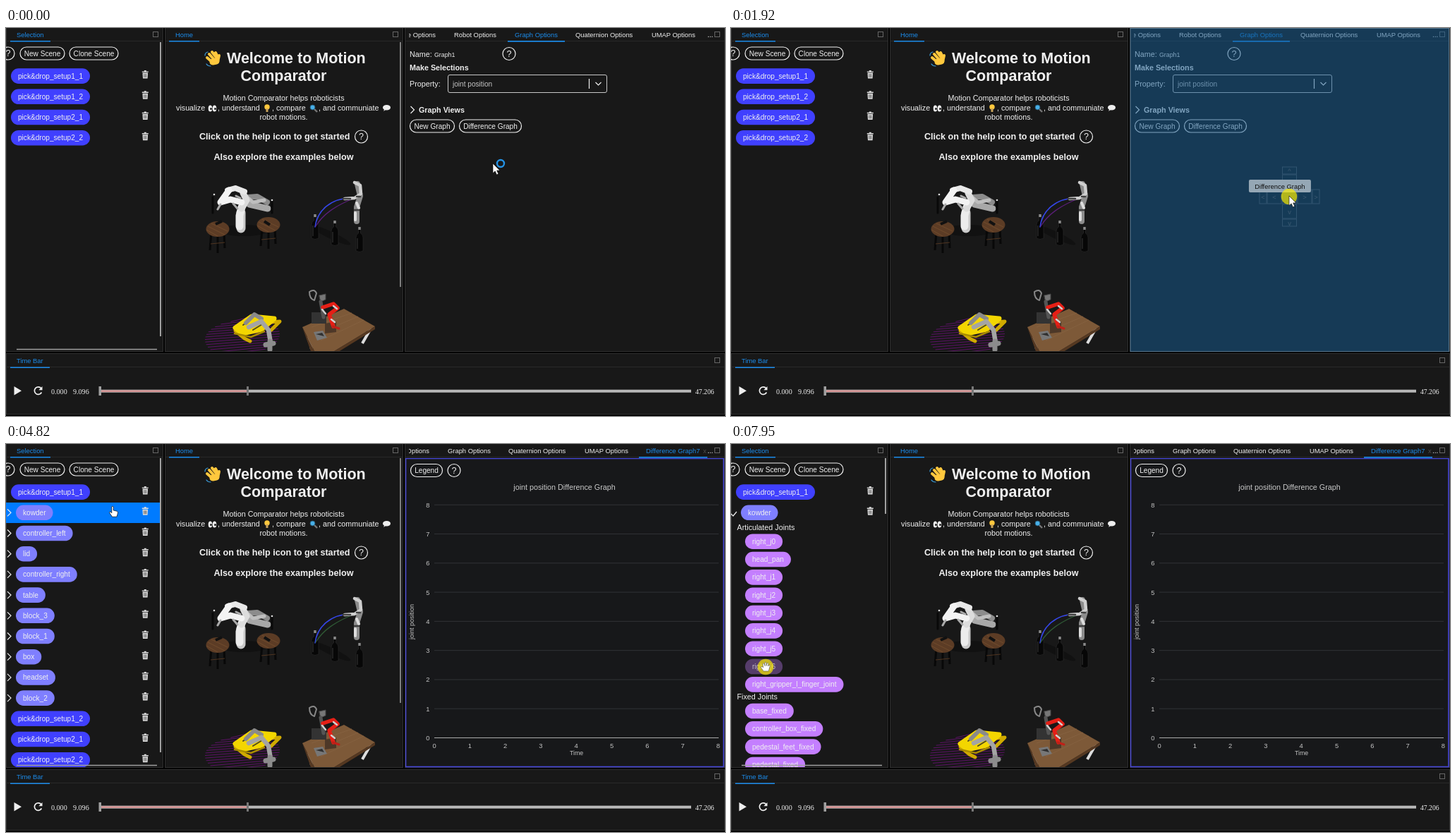
An HTML page that plays this animation: 1019x550 px, repeating every 8000 ms.

```html
<!DOCTYPE html>
<html lang="en">
<head>
<meta charset="utf-8">
<title>Motion Comparator</title>
<style>
html, body { margin: 0; width: 100%; height: 100%; overflow: hidden; background: #000; }
svg { display: block; width: 1019px; height: 550px; }
text { font: 10.1px "Liberation Sans", Arial, sans-serif; fill: #f0f0f0; dominant-baseline: central; white-space: pre; }
.tab { font-size: 9.4px; }
.on { fill: #1c8ceb; }
.body { font-size: 10.75px; }
.bold { font-size: 10.75px; font-weight: bold; }
.h1 { font-size: 21.5px; font-weight: bold; }
.h3 { font-size: 12.6px; font-weight: bold; }
.name { font-size: 8.8px; }
.time { font-family: "Liberation Serif", "Times New Roman", serif; }
.tick { font-size: 9.4px; fill: #c4c4c4; }
.mid { text-anchor: middle; }
.end { text-anchor: end; }
.line { fill: none; stroke: #f0f0f0; stroke-width: 1.2; }
.bar { stroke: #a0a0a0; stroke-width: 1.5; }
.limb { fill: none; stroke-linecap: round; stroke-linejoin: round; }
.dim rect { opacity: .36; }
.dim text { opacity: .7; }
</style>
</head>
<body>
<svg viewBox="0 0 1019 550">
  <defs>
    <clipPath id="listClip"><rect y="20" width="221" height="438"/></clipPath>
    <clipPath id="homeClip"><rect x="226" y="20" width="337" height="438"/></clipPath>
    <clipPath id="paneClip"><rect x="566" y="20" width="452" height="439"/></clipPath>
    <clipPath id="tabClip"><rect x="571" width="423" height="20"/></clipPath>
    <g id="trash"><path d="M-4.5-4H4.5M-1.5-5.3H1.5" stroke="#ddd" stroke-width="1.4"/><path d="M-3.8-2.5H3.8L3.3 5.5H-3.3Z" fill="#ddd"/><path d="M-1.6-1V4M0-1V4M1.6-1V4" stroke="#222" stroke-width=".6"/></g>
    <g id="bottle"><path d="M-1.5-19H1.5V-11Q5-9 5-5V14Q0 17-5 14V-5Q-5-9-1.5-11Z" fill="#070707" stroke="#333" stroke-width=".5"/><path d="M-1.7-20H1.7V-16H-1.7Z" fill="#8a8a8a"/><path d="M-3-4V11" stroke="#3b3b3b"/></g>
    <g id="stool"><path d="M-9 4L-11 30M9 4L10 27M0 6V34" stroke="#080808" stroke-width="3"/><path d="M-10 21L10 19" stroke="#503520"/><ellipse rx="16.5" ry="11" fill="#5c3c25"/><path d="M-14-4L10 8M-9-8L14 3M-16 1L0 10" stroke="#75502f" stroke-width=".8"/></g>
  </defs>
  <g id="frames"></g>
  <g id="tabs"></g>

  <g clip-path="url(#listClip)">
    <rect id="hover" width="219" height="29" fill="#007bff"/>
    <g id="rows4"></g><g id="rows14"></g><g id="joints"></g>
    <g id="listBars"><rect id="thumb" x="218" y="20" width="2" fill="#a0a0a0"/><path class="bar" d="M15 455.5H214"/></g>
  </g>
  <g id="tools"></g>

  <g clip-path="url(#homeClip)">
    <path id="homeBar" class="bar" d="M559 20V367"/>
    <g id="homeText"></g>
    <!-- emoji -->
    <g class="limb" stroke="#ffc83d" stroke-width="4">
      <path d="M288 37L296 46M292 34L299 43M285 42L293 49M297 35L300 41M302 39L300 48"/>
      <path d="M293 48L298 47" stroke-width="9"/>
      <path d="M282 39Q282 35 286 34M284 51Q286 54 290 54" stroke="#3b9ddb" stroke-width="1.2"/>
    </g>
    <ellipse cx="289.5" cy="114" rx="2.8" ry="4.5" fill="#eee"/><ellipse cx="295.5" cy="114" rx="2.8" ry="4.5" fill="#eee"/>
    <circle cx="290.5" cy="114.5" r="1.5" fill="#222"/><circle cx="296.5" cy="114.5" r="1.5" fill="#222"/>
    <circle cx="370" cy="112" r="3.7" fill="#ffc83d"/><path d="M368.5 114H371.5V119H368.5Z" fill="#c9a25a"/>
    <path d="M437 115L441 119" stroke="#777" stroke-width="2.4"/><circle cx="434.5" cy="112.5" r="3.4" fill="#48b0e8" stroke="#286080"/>
    <path d="M535 118L537 114H541Z" fill="#eee"/><ellipse cx="539.5" cy="112.7" rx="5.5" ry="3.8" fill="#eee"/>

    <!-- twin arms -->
    <ellipse cx="337" cy="287" rx="35" ry="8" fill="#111"/>
    <g class="limb">
      <path d="M343 240L356 239L370 247" stroke="#8c8c8c" stroke-width="8"/>
      <path d="M345 250L358 253L371 256" stroke="#a8a8a8" stroke-width="9"/>
      <path d="M340 238L350 247L366 244" stroke="#bebebe" stroke-width="5"/>
      <path d="M293 240V262M377 246V262" stroke="#090909" stroke-width="3"/>
    </g>
    <use href="#stool" x="300" y="285"/><use href="#stool" x="372" y="279"/>
    <path d="M297 278L306 274M366 274L374 279" stroke="#111" stroke-width="4"/>
    <g class="limb">
      <path d="M333 284V262" stroke="#c9c9c9" stroke-width="13"/>
      <path d="M331 281V266L334 254" stroke="#ececec" stroke-width="11"/>
      <path d="M334 256L341 244L336 234" stroke="#dcdcdc" stroke-width="9"/>
      <path d="M338 232L325 227L314 230" stroke="#e8e8e8" stroke-width="8"/>
      <path d="M316 230L304 247L318 243L334 247" stroke="#f3f3f3" stroke-width="9"/>
      <path d="M304 250L300 257M322 249L328 256M326 238L332 241" stroke="#aaa" stroke-width="3"/>
    </g>
    <circle cx="295" cy="236" r="1.3" fill="#ddd"/><circle cx="377" cy="244" r="1.3" fill="#ddd"/>

    <!-- arm with traces -->
    <ellipse cx="461" cy="294" rx="30" ry="5" fill="#111" transform="rotate(25 461 294)"/>
    <use href="#bottle" x="438" y="284"/><use href="#bottle" x="466" y="293"/><use href="#bottle" x="501" y="302"/>
    <g class="limb">
      <path d="M438 282C441 259 460 241 490 241" stroke="#3546e8" stroke-width="1.6"/>
      <path id="trace" d="M439 281C449 264 466 253 489 243" stroke="#5a1e78" stroke-width="1.3"/>
      <path d="M497 274V254L502 238L498 221" stroke="#8c8c8c" stroke-width="8"/>
      <path d="M494 219L502 223L503 235L494 241L480 242" stroke="#cfcfcf" stroke-width="4.5"/>
      <path d="M495 262V272M497 248L500 255" stroke="#ddd" stroke-width="4"/>
      <path d="M478 242H488M497 239H502M494 258H500" stroke="#404040" stroke-width="2.5"/>
    </g>

    <!-- walking robot -->
    <g id="disc" stroke="#5c1266" stroke-width="1"></g>
    <g class="limb">
      <path d="M325 429L338 440L346 444M372 417L388 416L376 428" stroke="#d0aa00" stroke-width="5"/>
      <path d="M325 425L348 409L380 412L362 427L335 433Z" fill="#f3d600" stroke="#f3d600" stroke-width="7"/>
      <path d="M324 433L347 438L366 430" stroke="#a88b00" stroke-width="2.5"/>
      <path d="M336 421L347 413M350 428L363 420" stroke="#514a20" stroke-width="2"/>
      <path d="M340 418L352 406L362 412" stroke="#8a8a8a" stroke-width="6"/>
      <path d="M344 424L362 416L372 428L375 446" stroke="#a4a4a4" stroke-width="6.5"/>
      <path d="M374 444V456M368 449L379 447" stroke="#8c8c8c" stroke-width="7"/>
    </g>

    <!-- table scene -->
    <path d="M428 432L433 455M517 426L505 447" stroke="#ddd" stroke-width="4"/>
    <path d="M420 424L479 398L523 423L462 460H438Z" fill="#7d5938"/>
    <path d="M420 424L438 460H462L523 423V427L463 464H434Z" fill="#553821"/>
    <path d="M433 424L490 404M446 443L507 414M440 434L499 409" stroke="#856140"/>
    <path d="M433 403H454V419H433Z" fill="#333"/><path d="M436 431L449 429L455 439L441 443Z" fill="#777"/><path d="M439 434L448 432L451 437" fill="#303030"/>
    <path d="M452 419L468 416V431L452 433Z" fill="#4d3828"/>
    <g class="limb">
      <path d="M430 374Q437 369 440 376L437 386Q430 384 430 374" stroke="#888" stroke-width="2"/>
      <path d="M444 379L453 377V385L446 388Z" fill="#777" stroke="#444"/>
      <path d="M446 388L450 410" stroke="#555" stroke-width="5"/>
      <path d="M449 396L464 391L470 397L458 406L464 423" stroke="#e51f16" stroke-width="5.5"/>
      <path d="M448 399L453 405M464 394L469 398M461 413L466 417" stroke="#d0d0d0" stroke-width="2.5"/>
      <path d="M463 423L472 426" stroke="#c02018" stroke-width="3"/>
    </g>
  </g>

  <g clip-path="url(#paneClip)"><g id="slider"><g id="options"></g><g id="graph" transform="translate(904)"></g></g></g>
  <g id="timeBar"></g>

  <g id="drag">
    <rect id="drop" fill="rgb(20,92,148)" fill-opacity=".5" stroke="#56758c"/>
    <g id="guide" opacity=".17"></g>
    <g id="ghost"><rect x="-57" y="-23" width="88" height="18" rx="2" fill="#95a7b5"/><text class="tab mid" x="-13" y="-13.5" style="fill:#111">Difference Graph</text></g>
  </g>
  <g id="mouse">
    <circle id="ring" cx="11" cy="0" r="5" fill="none" stroke="#2492e4" stroke-width="2.4"/>
    <circle id="press" cy="1" r="11.3" fill="#fff000" opacity=".68"/>
    <path id="arrow" d="M0 0V13.7L3.2 10.9L5.4 15.9L7.9 14.8L5.7 10H10Z" fill="#fff" stroke="#000" stroke-width=".6"/>
    <path id="finger" d="M-1.2 1Q0-.8 1.2 1V6L6.5 7.3Q7.8 7.8 7.5 10L6 15.2H-.5L-4.3 9.5Q-4.4 7.6-2.7 8.2L-1.2 9.7Z" fill="#fff" stroke="#000" stroke-width=".7"/>
    <path id="palm" d="M-3 7L-6.5 1.8Q-6.5 0-4.8.5L-3.3 2L-4-3.2Q-3.2-5-2-3.4L-1-.5V-5Q0-6.5 1-5V-.5L2.2-4.2Q3.4-5.4 4-3.6L3.4 0L5-1.7Q6.6-2 6.2 0L4.2 7Z" fill="#fff" stroke="#555" stroke-width=".6"/>
  </g>
</svg>
<script>
const $ = id => document.getElementById(id);
const fill = (id, ...parts) => { $(id).innerHTML = parts.flat().join(''); };
const show = (id, on) => { $(id).style.display = on ? '' : 'none'; };
const ruler = document.createElement('canvas').getContext('2d');
ruler.font = '10.1px "Liberation Sans", Arial, sans-serif';

const esc = s => s.replace('&', '&amp;').replace('<', '&lt;');
const text = (s, x, y, cls = '') => `<text x="${x}" y="${y}" class="${cls}">${esc(s)}</text>`;
const rect = (x, y, w, h, attrs) => `<rect x="${x}" y="${y}" width="${w}" height="${h}" ${attrs}/>`;
const path = (d, attrs = 'class="line"') => `<path d="${d}" ${attrs}/>`;
const box = (x, y) => rect(x, y, 7, 7, 'fill="none" stroke="#666"');
const help = (x, y) => `<circle cx="${x}" cy="${y}" r="9" class="line"/>` + text('?', x, y, 'h3 mid" style="font-weight:400');
const button = (s, x, y, w) => rect(x, y - 9, w, 18, 'rx="9" class="line"') + text(s, x + w / 2, y, 'mid');
const pill = (s, x, y, color, id = '') =>
  `<g id="${id}">${rect(x, y - 10.8, ruler.measureText(s).width + 20, 21.6, `rx="10.8" fill="${color}"`)}${text(s, x + 10, y)}</g>`;
const trash = y => `<use href="#trash" x="197.3" y="${y - 2}"/>`;
const blue = '#4040ff', violet = '#7f7fff', purple = '#c47fff';
const rowY = i => 68.1 + 29.2 * i;
const jointY = i => 138.2 + 25.33 * i;

// Panels and tabs
const panel = (x, y, w, h) => rect(x + .5, y + .5, w, h, 'fill="#181818" stroke="#303030"') + path(`M${x} ${y + 19.5}h${w}`, 'stroke="#292929"');
fill('frames', panel(0, -1, 222, 459), panel(225, -1, 337, 459), panel(565, -1, 453, 459), panel(0, 461, 1018, 86),
  text('Selection', 15, 9, 'tab on'), text('Home', 240, 9, 'tab on'), text('Time Bar', 15, 471, 'tab on'),
  path('M6 18.7H63M231 18.7H274M6 481.2H62', 'stroke="#1c8ceb" stroke-width="1.6"'),
  box(208.5, 5.5), box(548.5, 5.5), box(1004.5, 5.5), box(1004.5, 467.5), text('...', 994, 9));
$('tabs').setAttribute('clip-path', 'url(#tabClip)');
fill('tabs', '<g id="strip">', text('Scene Options', 609, 9, 'tab end'), text('Robot Options', 635, 9, 'tab'),
  text('Graph Options', 721, 9, 'tab" id="tabA'), text('Quaternion Options', 807, 9, 'tab'), text('UMAP Options', 915, 9, 'tab'),
  text('Difference Graph7', 1002, 9, 'tab" id="tabB'), text('x', 1083, 9, 'tab" opacity=".25'),
  '<rect id="ink" y="18" height="1.7" class="on"/></g>');

// Selection list
const sets = ['1_1', '1_2', '2_1', '2_2'].map(s => 'pick&drop_setup' + s);
const items = ['kowder', 'controller_left', 'lid', 'controller_right', 'table', 'block_3', 'block_1', 'box', 'headset', 'block_2'];
const joints = ['right_j0', 'head_pan', 'right_j1', 'right_j2', 'right_j3', 'right_j4', 'right_j5', 'right_j6', 'right_gripper_l_finger_joint'];
const fixed = ['base_fixed', 'controller_box_fixed', 'pedestal_feet_fixed', 'pedestal_fixed'];
const setRow = (s, i) => pill(s, 7, rowY(i), blue) + trash(rowY(i));
fill('tools', help(3, 36), button('New Scene', 20, 36, 63), button('Clone Scene', 90, 36, 69));
fill('rows4', sets.map(setRow));
fill('rows14', setRow(sets[0], 0),
  items.map((s, i) => pill(s, 14, rowY(i + 1), violet) + trash(rowY(i + 1)) + path(`M2 ${rowY(i + 1) - 5}l5 5l-5 5`)),
  sets.slice(1).map((s, i) => setRow(s, i + 11)));
fill('joints', setRow(sets[0], 0), pill(items[0], 14, rowY(1), violet), trash(rowY(1)), path('M0 99L3 102L8 96'),
  text('Articulated Joints', 8.5, 117.5, 'body'), joints.map((s, i) => pill(s, 20, jointY(i), purple, 'joint' + i)),
  text('Fixed Joints', 8.5, 357.5, 'body'), fixed.map((s, i) => pill(s, 20, 378.5 + 25.33 * i, purple)));

// Home page
fill('homeText', text('Welcome to Motion', 313, 43, 'h1'), text('Comparator', 393.5, 68, 'h1 mid'),
  text('Motion Comparator helps roboticists', 393.5, 98.5, 'body mid'),
  text('visualize', 241, 113, 'body'), text(', understand', 300, 113, 'body'), text(', compare', 377, 113, 'body'),
  text(', and communiate', 443, 113, 'body'), text('robot motions.', 393.5, 125.5, 'body mid'),
  text('Click on the help icon to get started', 274, 154, 'h3'), help(503.5, 154),
  text('Also explore the examples below', 393.5, 183, 'h3 mid'));
fill('disc', Array.from({ length: 15 }, (_, i) => {
  const u = i / 7.5 - .95, w = 53 * Math.sqrt(1 - u * u), y = 438 + 27 * u;
  return path(`M${335 - w} ${y + 4}L${335 + w} ${y - 4}`, '');
}));

// Option pane and graph pane
fill('options', text('Name:', 572, 37, 'body'), text('Graph1', 607, 37.5, 'name" id="graphName'), help(713, 36.5),
  text('Make Selections', 572, 56, 'bold'), text('Property:', 572, 79, 'body'),
  rect(626.5, 66.5, 225, 25, 'rx="2.5" fill="none" stroke="#c8c8c8"'), text('joint position', 633, 79, '" style="fill:#c4c4c4'),
  path('M826.5 72V86M835.5 77l4 4l4-4'), path('M573.5 111l5 5l-5 5'), text('Graph Views', 585, 116, 'bold'),
  button('New Graph', 572.5, 139, 63), button('Difference Graph', 642.5, 139, 88));
const ticks = [...Array(9).keys()];
fill('graph', rect(566.5, 20.5, 450.5, 437, 'fill="#17181a" stroke="#4646d8" stroke-width="1.6"'),
  button('Legend', 573.5, 37.5, 45), help(635, 37.5),
  text('joint position Difference Graph', 791.5, 60.5, 'body mid" style="fill:#c8c8c8'),
  ticks.map(i => path(`M607 ${416.5 - 41.28 * i}H1010`, `stroke="${i ? '#303236' : '#aaa'}"`) +
    text(`${i}`, 600.5, 416.5 - 41.28 * i, 'tick end') + text(`${i}`, 607 + 50.3 * i, 427, 'tick mid')),
  text('Time', 808.5, 437.5, 'tick mid" style="font-size:8.8px'),
  text('joint position', 0, 0, 'tick mid" style="font-size:9px" transform="translate(574.5 252) rotate(-90)'));

fill('timeBar', path('M11.5 508V520.5L22 514.2Z', 'fill="#eee"'),
  path('M50 511A5.3 5.3 0 1 0 50.4 516.5', 'class="line" style="stroke-width:1.7"'), path('M51.5 508V513.2H46.3Z', 'fill="#eee"'),
  text('0.000', 64, 515, 'time'), text('9.096', 95, 515, 'time'), text('47.206', 977, 515, 'time" style="font-size:9.7px'),
  rect(133, 512.7, 838, 4, 'fill="#b8b8b8"'), rect(134, 513.5, 208, 2.4, 'fill="#d58f8f"'),
  rect(131.5, 508, 3.5, 13, 'fill="#a0a0a0"'), rect(341, 508, 3, 13, 'fill="#777"'));

const cell = (x, y, w, h, s) => rect(x, y, w, h, 'fill="#14405f" stroke="#b0d4f0"') + text(s, x + w / 2, y + h / 2, 'tab mid');
fill('guide', cell(749, 229, 10, 20, '<'), cell(760, 229, 20, 20, '<'), cell(781.5, 229, 20, 20, ''), cell(803, 229, 20, 20, '>'),
  cell(824, 229, 10, 20, '>'), cell(781.5, 250, 20, 20, 'v'), cell(781.5, 271, 20, 10, 'v'),
  cell(781.5, 208, 20, 20, '^'), cell(781.5, 197, 20, 10, '^'));

// Bursts in which the screen refreshes; it holds still between them
const bursts = [[0, 130], [450, 1220], [1300, 2000], [2160, 2320], [2560, 3330], [3400, 4180], [4260, 4260], [4420, 4580],
  [4820, 5610], [5680, 5680], [5840, 5920], [6080, 6850], [6930, 7170], [7410, 7790], [7950, 7950]];
// Pointer stops: time, x, y
const stops = [[450, 690, 192], [840, 677, 139], [1000, 677, 139], [1220, 749, 164], [1300, 757, 180], [1610, 783, 222],
  [1850, 790, 237], [2000, 792, 239], [2560, 792, 239], [3330, 626, 112], [3400, 620, 108], [3950, 181, 91], [4180, 160, 83],
  [4260, 155, 80], [4580, 155, 80], [4820, 151, 88], [5200, 145, 240], [5610, 135, 105], [5680, 136, 107], [6000, 136, 107],
  [6080, 142, 144], [6850, 125, 372], [6930, 118, 362], [7170, 98, 342], [7410, 90, 338], [7790, 49, 315]];

const smooth = (t, a, b) => { const p = Math.min(1, Math.max(0, (t - a) / (b - a))); return p * p * (3 - 2 * p); };
// Snaps the time to the last refresh, with a little slack for uneven steps
function held(t) {
  const [a, b] = bursts.findLast(s => s[0] <= t);
  if (a === b || t >= b) return b;
  const step = (b - a) / Math.round((b - a) / 77);
  return Math.min(b, a + Math.floor((t - a) / step + .08) * step);
}
function pointer(t) {
  const i = stops.findIndex(s => s[0] > t);
  if (i === 0) return stops[0].slice(1);
  if (i < 0) return stops.at(-1).slice(1);
  const [a, b] = [stops[i - 1], stops[i]], p = smooth(t, a[0], b[0]);
  return [a[1] + (b[1] - a[1]) * p, a[2] + (b[2] - a[2]) * p];
}
const move = (id, x, y = 0) => $(id).setAttribute('transform', `translate(${x} ${y})`);
function size(id, x, y, w, h) {
  Object.entries({ x, y, width: w, height: h }).forEach(([k, v]) => $(id).setAttribute(k, v));
}

function draw(t) {
  const [x, y] = pointer(t);
  const opened = t >= 4420, unfolded = t >= 5840, graphOn = t >= 2640;

  // list
  show('rows4', !opened);
  show('rows14', opened && !unfolded);
  show('joints', unfolded);
  $('thumb').setAttribute('height', unfolded ? 79 : 417);
  const row = Math.floor((y - 53.8) / 29.2);
  const onRow = x < 219 && row >= 0 && row < (unfolded ? 2 : opened ? 14 : 4);
  show('hover', onRow);
  $('hover').setAttribute('y', 53.8 + 29.2 * row);
  let grab = false;
  joints.forEach((s, i) => {
    const over = unfolded && x > 20 && x < (i === 8 ? 160 : 74) && Math.abs(y - jointY(i)) < 11;
    $('joint' + i).classList.toggle('dim', over);
    grab = grab || over;
  });

  // scrollbars fade out when idle and return under the pointer
  show('listBars', t < 1840 || (t >= 3400 && x < 222));
  show('homeBar', t < 1840 || (t >= 3400 && x < 563 && t < 6460));

  // right panel
  $('graphName').textContent = t >= 2200 ? 'Difference Graph7' : 'Graph1';
  move('slider', -904 * smooth(t, 2513, 2833));
  move('strip', -95 * smooth(t, 2600, 2860));
  $('tabA').classList.toggle('on', !graphOn);
  $('tabB').classList.toggle('on', graphOn);
  $('ink').setAttribute('x', graphOn ? 992 : 711);
  $('ink').setAttribute('width', graphOn ? 97 : 81);
  $('trace').setAttribute('stroke', t >= 3400 ? '#2f5a35' : '#5a1e78');

  // drag and drop
  show('drag', t >= 980 && t < 2160);
  if (t >= 1840) size('drop', 566, .5, 451.5, 458);
  else size('drop', x - 116.5, y - 26.5, 201.5, 201.5);
  show('guide', x > 700);
  move('ghost', x, y);

  // mouse
  move('mouse', x, y);
  show('ring', t < 130);
  show('press', (t >= 900 && t < 2160) || (t >= 4420 && t < 4490) || (t >= 5840 && t < 5900) || t >= 7950);
  show('finger', onRow);
  show('palm', grab);
  show('arrow', !onRow && !grab);
}

const start = performance.now();
function tick() {
  draw(held((performance.now() - start) % 8000));
  requestAnimationFrame(tick);
}
tick();
</script>
</body>
</html>
```
